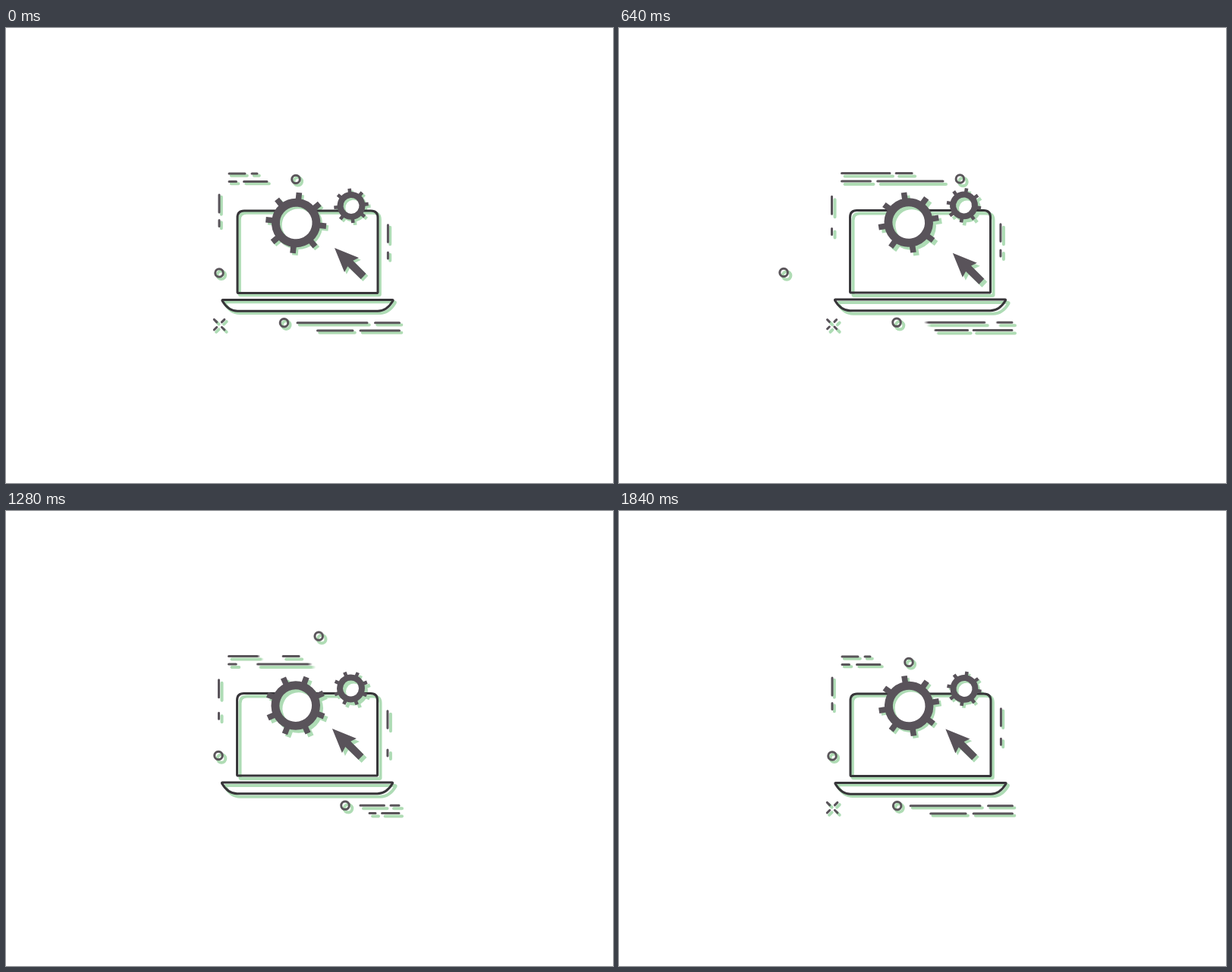
These frames come from a looping animation (800 by 600 pixels, 1880 ms). An HTML page with a canvas:

```html
<!DOCTYPE html>
<html lang="en">
<head>
<meta charset="utf-8">
<title>Laptop and gears</title>
<style>
html, body { margin: 0; width: 100%; height: 100%; overflow: hidden; background: #fff; }
canvas { display: block; }
</style>
</head>
<body>
<canvas id="stage" width="800" height="600"></canvas>
<script>
// Times below count in steps of 40 ms; the motion has a period of 48 steps, cut at 47.
const STEP = 40, STEPS = 47, PERIOD = 48;
const GREEN = '#aedcb5', INK = '#59535a', OUTLINE = '#373539';
const stage = document.getElementById('stage');
const main = stage.getContext('2d');
const layer = document.createElement('canvas');
layer.width = 800;
layer.height = 600;
const soft = layer.getContext('2d');

function ease(u) {
  if (u <= 0) return 0;
  if (u >= 1) return 1;
  return u < 0.5 ? 4 * u ** 3 : 1 - 4 * (1 - u) ** 3;
}

// Eased step from 0 to 1 that may run past the end of the period.
const step = (t, from, to, period) =>
  ease((t - from) / (to - from)) + ease((t + period - from) / (to - from)) - 1;

// Rises from 0 to 1 during a..b and falls back during c..d.
const beat = (a, b, c, d, period = PERIOD) => t =>
  step(t, a, b, period) - step(t, c, d, period);

const between = (rest, peak, pulse) => t => rest + (peak - rest) * pulse(t);
const fixed = v => () => v;

const topFirst = beat(4, 18, 24, 39);
const topSecond = beat(4, 19, 29, 44);
const midFirst = beat(2, 17, 18, 34);
const midSecond = beat(4, 18, 25, 41);
const lowFirst = beat(10.5, 24, 31, 47);
const lowSecond = beat(9, 22, 31, 47);
const endFirst = beat(11, 28, 36, 47);
const endSecond = beat(13, 30, 36, 47);
const leftSide = beat(10, 22, 23, 42);
const rightSide = beat(20, 37, 36, 53);

// Horizontal dashes: y, left end, right end
const rows = [
  [192, fixed(294), between(315, 358, topFirst)],
  [192, between(324, 367, topSecond), between(331, 388.5, topSecond)],
  [202.4, fixed(294), between(303.5, 332, midFirst)],
  [202.4, between(313.5, 341.5, midSecond), between(344, 428.5, midSecond)],
  [388.7, between(384, 467.5, lowFirst), between(476, 499, lowFirst)],
  [388.7, between(486.5, 507.5, lowSecond), fixed(518.5)],
  [399, between(410.5, 479.5, endFirst), between(457, 487.5, endFirst)],
  [399, between(467, 496, endSecond), fixed(518.5)]
];

// Vertical dashes: x, top, length
const columns = [
  [281, between(220, 225.5, leftSide), 23],
  [281, between(253.5, 276.5, leftSide), 8],
  [503.4, between(259.3, 264.7, rightSide), 22.5],
  [503.4, between(293.5, 318, rightSide), 8]
];

// The top ring goes right, then up and left, then back down.
const ringRight = beat(4, 17, 19, 30);
const ringUp = beat(19, 30, 29, 42);
const rings = [
  [t => 382 + 68 * ringRight(t) + 32.3 * ringUp(t), between(199.5, 163.8, ringUp)],
  [between(281, 217.5, beat(1, 17, 18, 34)), fixed(323)],
  [between(366.5, 447.5, beat(18, 29, 34, 47)), fixed(388.8)]
];

const nudge = between(-2.6, 7.6, beat(8, 18, 18, 28, PERIOD / 2));
const sparkInner = between(3.3, 6.4, beat(31, 33, 37, 46));
const sparkOuter = between(6.8, 3.4, beat(8, 29, 31, 33));
const sparkAlpha = between(1, 0, beat(23, 32, 33, 39));

const screen = new Path2D(
  'M355 241H314Q305 241 305 250V348.2Q305 349.5 306.3 349.5H488.7Q490 349.5 490 348.2V250Q490 241 481 241H471' +
  'M439 241H409');
const base = new Path2D(
  'M286 358.4H509Q510.8 358.4 509.8 360C505 368 499 373.2 490 373.2H305C296 373.2 290 368 285.2 360Q284.3 358.4 286 358.4Z');
const arrow = new Path2D(
  'M433 290L465 303L457.3 306.8L474.5 324L467.7 331.2L450.3 314.2L446 322Z');

function pen(c, color, width) {
  c.strokeStyle = c.fillStyle = color;
  c.lineWidth = width;
  c.lineCap = c.lineJoin = 'round';
}

function line(c, x1, y1, x2, y2) {
  c.moveTo(x1, y1);
  c.lineTo(x2, y2);
}

function drawGear(c, x, y, inner, outer, tip, half, degrees) {
  c.save();
  c.translate(x, y);
  c.rotate(degrees * Math.PI / 180);
  c.lineWidth = outer - inner;
  c.beginPath();
  c.arc(0, 0, (inner + outer) / 2, 0, 2 * Math.PI);
  c.stroke();
  for (let i = 0; i < 8; i++) {
    c.fillRect(-half, -tip, 2 * half, tip - outer + 1.5);
    c.rotate(Math.PI / 4);
  }
  c.restore();
}

function drawMovers(c, t) {
  c.beginPath();
  for (const [y, left, right] of rows) line(c, left(t), y, right(t), y);
  for (const [x, y] of rings) {
    c.moveTo(x(t) + 5.3, y(t));
    c.arc(x(t), y(t), 5.3, 0, 2 * Math.PI);
  }
  c.stroke();
}

// Average five moments of the open shutter for motion blur.
function blurMovers(t, color, width, shift) {
  soft.clearRect(0, 0, 800, 600);
  soft.save();
  soft.translate(shift, shift);
  soft.globalCompositeOperation = 'lighter';
  soft.globalAlpha = 0.2;
  pen(soft, color, width);
  for (let k = -2; k <= 2; k++) drawMovers(soft, t + k * 0.1);
  soft.restore();
  main.drawImage(layer, 0, 0);
}

function drawSpark(c, t) {
  const a = sparkInner(t), b = sparkOuter(t);
  c.save();
  c.globalAlpha = sparkAlpha(t);
  c.translate(281.1, 391.2);
  c.beginPath();
  for (const x of [-1, 1]) {
    for (const y of [-1, 1]) line(c, x * a, y * a, x * b, y * b);
  }
  c.stroke();
  c.restore();
}

function drawPass(t, shift, shadow) {
  const c = main, color = shadow ? GREEN : INK, width = shadow ? 4 : 3;
  c.save();
  c.translate(shift, shift);
  pen(c, shadow ? GREEN : OUTLINE, width);
  c.stroke(screen);
  c.stroke(base);
  pen(c, color, width);
  c.beginPath();
  for (const [x, top, length] of columns) line(c, x, top(t), x, top(t) + length);
  c.stroke();
  drawSpark(c, t);
  drawGear(c, 382.2, 257, 21.3, 32.2, 40, 3.8, 6 + 7.5 * t);
  drawGear(c, 455, 234.4, 10.5, 18.4, 22.8, 2.3, -6 - 7.5 * t);
  c.translate(nudge(t), nudge(t));
  c.fill(arrow);
  c.restore();
  blurMovers(t, color, width, shift);
}

function draw(t) {
  main.fillStyle = '#fff';
  main.fillRect(0, 0, 800, 600);
  const lift = 0.8 * (1 - Math.cos(2 * Math.PI * t / PERIOD));
  drawPass(t, 2.8 + 0.6 * lift, true);
  drawPass(t, -0.4 * lift, false);
}

const start = performance.now();
function tick() {
  draw(Math.floor((performance.now() - start) / STEP) % STEPS);
  requestAnimationFrame(tick);
}
tick();
</script>
</body>
</html>
```
